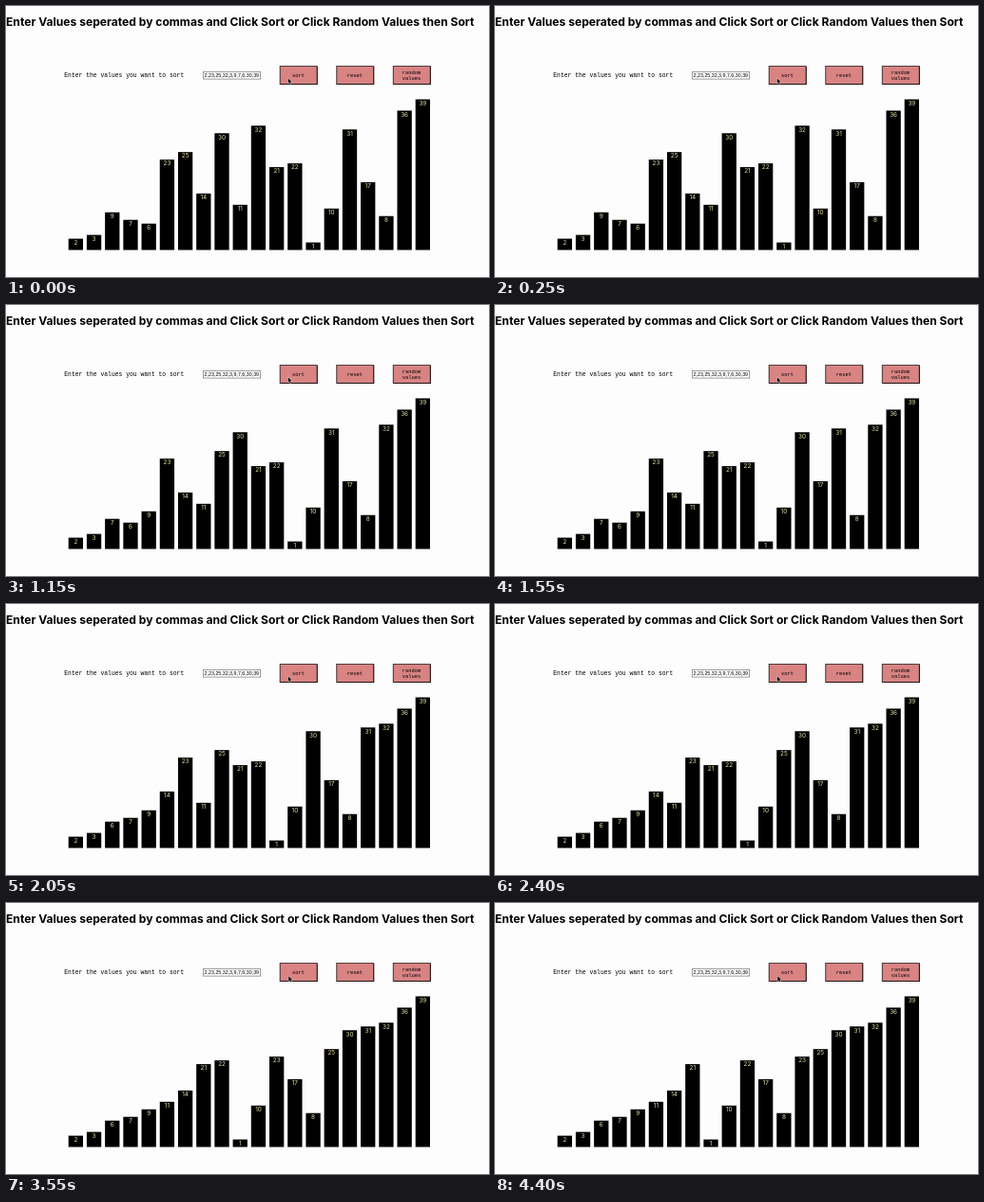
Recreate the animation shown at these times as an HTML page with a canvas. Size 508 by 286 pixels, loop 5000 ms.

```html
<!DOCTYPE html>
<html lang="en">
<head>
<meta charset="utf-8">
<title>Bubble sort</title>
<style>
  html, body { margin: 0; width: 100%; height: 100%; overflow: hidden; background: #fdfdfd; }
  canvas { display: block; width: 508px; height: 286px; }
</style>
</head>
<body>
<canvas id="stage"></canvas>
<script>
const W = 508, H = 286, LOOP = 5000, TICK = 50, STEP = 61;
const SANS = 'Inter, "Liberation Sans", sans-serif';
const MONO = '"Liberation Mono", "Courier New", monospace';
const ARIAL = '"Liberation Sans", Arial, sans-serif';

const canvas = document.getElementById('stage');
const ctx = canvas.getContext('2d');
const dpr = window.devicePixelRatio || 1;
canvas.width = W * dpr;
canvas.height = H * dpr;
ctx.scale(dpr, dpr);

const start = [2, 3, 9, 7, 6, 23, 25, 14, 30, 11, 32, 21, 22, 1, 10, 31, 17, 8, 36, 39];
const passes = [-458, 681, 1742, 2755, 3690];

// Bubble sort, joined midway through a pass; every swap gets a time.
function planSwaps() {
  const list = start.slice(), swaps = [];
  passes.forEach((begin, p) => {
    for (let i = p ? 0 : 8; i < list.length - 1; i++) {
      if (list[i] <= list[i + 1]) continue;
      swap(list, i);
      swaps.push({ i, at: Math.round((begin + i * STEP) / TICK) * TICK });
    }
  });
  return swaps;
}

function swap(list, i) {
  [list[i], list[i + 1]] = [list[i + 1], list[i]];
}

const swaps = planSwaps();

function valuesAt(t) {
  const list = start.slice();
  for (const s of swaps) if (s.at <= t) swap(list, s.i);
  return list;
}

function rect(x, y, w, h, color) {
  ctx.fillStyle = color;
  ctx.fillRect(x, y, w, h);
}

function text(str, x, y, font, color = '#000', align = 'left') {
  ctx.font = font;
  ctx.fillStyle = color;
  ctx.textAlign = align;
  ctx.fillText(str, x, y);
}

function button(x, lines) {
  const y = 63, w = 40, h = 20;
  rect(x, y, w, h, '#4c3c3c');
  rect(x + 1, y + 1, w - 1, h - 1, '#1c1212');
  rect(x + 1, y + 1, w - 2, h - 2, '#d98383');
  const top = 75.2 - (lines.length - 1) * 3;
  lines.forEach((s, k) => text(s, x + w / 2 - 0.3, top + k * 6, '5.4px ' + MONO, '#000', 'center'));
}

function bar(v, i) {
  const x = 65.7 + i * 19.21, w = 15.3, h = 3.975 * (v + 1), y = 257.5 - h;
  rect(x, y, w, h, '#000');
  text(v, x + w / 2, y + 6.3, '6.4px ' + SANS, '#e6dfa6', 'center');
}

function cursor(x, y) {
  ctx.beginPath();
  [[0, 0], [0, 5.2], [1.2, 4.2], [2, 6], [2.9, 5.6], [2.1, 3.9], [3.7, 3.8]]
    .forEach(([px, py]) => ctx.lineTo(x + px, y + py));
  ctx.closePath();
  ctx.lineWidth = 0.8;
  ctx.strokeStyle = '#f4e4e4';
  ctx.stroke();
  ctx.fillStyle = '#000';
  ctx.fill();
}

function draw(t) {
  rect(0, 0, W, H, '#fdfdfd');
  text('Enter Values seperated by commas and Click Sort or Click Random Values then Sort',
    0, 20.5, 'bold 12.1px ' + SANS);
  text('Enter the values you want to sort', 61.3, 75, '6.36px ' + MONO);

  rect(207, 69, 61, 8.5, '#858585');
  rect(207.8, 69.8, 59.4, 6.9, '#fff');
  text('2,23,25,32,3,9,7,6,30,39', 208.6, 75.1, '5.3px ' + ARIAL);

  button(287.7, ['sort']);
  button(347.2, ['reset']);
  button(406.8, ['random', 'values']);

  valuesAt(t).forEach(bar);
  if (t < 3100) cursor(296.8, 76.4);
  else cursor(297.3, 77.2);
}

function loop() {
  draw(performance.now() % LOOP);
  requestAnimationFrame(loop);
}
loop();
</script>
</body>
</html>
```
